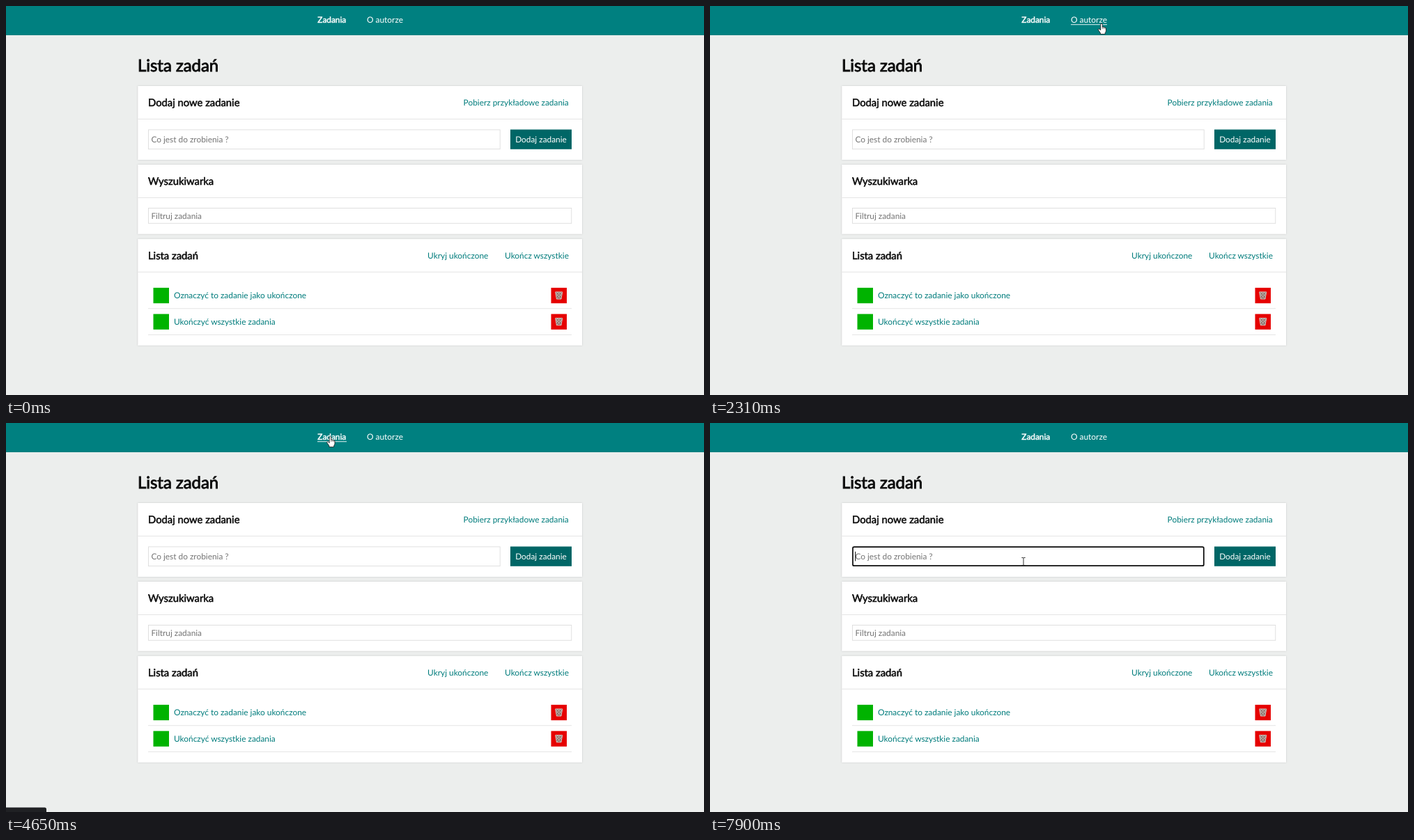
An HTML page for the animation above (8 s loop, 1002 by 559 pixels).

```html
<!DOCTYPE html>
<html lang="pl">
<meta charset="utf-8">
<title>Lista zadań</title>
<style>
  html, body { margin: 0; height: 100%; overflow: hidden; background: #eceeed }
  svg { display: block; width: 1002px; height: 559px }
  text { font: 11.88px Lato, sans-serif; fill: #0c0c0c; white-space: pre; text-rendering: geometricPrecision }
  .b { stroke: #0c0c0c; stroke-width: .038em }
  .copy { font-size: 11.74px }
  .h1 { font-size: 23.9px }
  .h2 { font-size: 14.8px }
  .h3 { font-size: 13.85px }
  .i { font-style: italic }
  .link { fill: #007c7c }
  .hint { fill: #757575 }
  .nav { fill: #fff }
  .nav.b { stroke: #fff }
  .mid { text-anchor: middle }
  .card { fill: #fff; filter: drop-shadow(0 0 1.2px #c4c6c6) }
  .line { fill: #e2e2e2 }
  .field { fill: #fff; stroke: #dcdcdc; stroke-width: .9 }
</style>
<svg id="stage" viewBox="0 0 1002 559"></svg>
<script>
const text = (x, y, cls, s) => `<text x="${x}" y="${y}" class="${cls}">${s}</text>`;
const rect = (x, y, w, h, attrs) => `<rect x="${x}" y="${y}" width="${w}" height="${h}" ${attrs}/>`;
const line = (x, y, w) => rect(x, y, w, .9, 'class="line"');

// White panel with a titled header
const card = (y, h, title) =>
  rect(189.3, y, 637.7, h, 'class="card"') + line(189.3, y + 47, 637.7) +
  text(204, y + 29.1, 'b h2', title);

const bin = (x, y) => `<g transform="translate(${x} ${y})" fill="none" stroke="#d9d2cb" stroke-width=".9">
  <path d="M.5 1.2H10.5L8.8 11.4H2.2Z" fill="#8d6f69"/>
  <path d="M.8 3 8.6 11M3.5 1.5 9 7.5M7 1.5 10 4.5M10.2 3 2.4 11M7.5 1.5 2 7.5M4 1.5 1 4.5" stroke-width=".7"/></g>`;

const task = (y, label) =>
  rect(211.5, y, 22.5, 22.3, 'fill="#00b300"') + text(241, y + 15, 'link', label) +
  rect(782.5, y, 22.5, 22.3, 'fill="#e60000"') + bin(788.2, y + 4.8) + line(204, y + 29.4, 608);

const tasksPage = text(189, 94.2, 'b h1', 'Lista zadań') +
  card(115, 106, 'Dodaj nowe zadanie') +
  text(732.2, 143.2, 'link mid', 'Pobierz przykładowe zadania') +
  rect(204.5, 177.9, 504.7, 27.7, 'class="field"') +
  text(208.4, 195.8, 'hint', 'Co jest do zrobienia ?') +
  rect(724, 177.5, 88, 28.3, 'fill="#006666"') +
  text(768, 195.8, 'nav mid', 'Dodaj zadanie') +
  card(228, 99.7, 'Wyszukiwarka') +
  rect(204.5, 290.5, 607.3, 21.8, 'class="field"') +
  text(208.4, 305.9, 'hint', 'Filtruj zadania') +
  card(334.8, 153, 'Lista zadań') +
  text(648.7, 362.7, 'link mid', 'Ukryj ukończone') +
  text(762, 362.7, 'link mid', 'Ukończ wszystkie') +
  task(404.9, 'Oznaczyć to zadanie jako ukończone') +
  task(442.6, 'Ukończyć wszystkie zadania') +
  `<g id="focus">${rect(205, 178.2, 503.8, 27, 'rx="2" fill="none" stroke="#0c0c0c" stroke-width="1.7"')}
   ${rect(208.2, 184.8, 1, 13.6, 'fill="#000"')}</g>`;

const aboutPage = text(189, 94.2, 'b h1', 'O autorze') +
  card(115, 317, 'Sebastian Dolań') + [
    [200.5, 'copy b', '"Nie tylko wysocy potrafią widzieć horyzonty"'],
    [214.4, 'copy', 'Nazywam Seba i jestem magistrem Inżynierii Biomedycznej.'],
    [240.1, 'copy i', 'Biomedical Engineer'],
    [269.2, 'b h3', 'Zainteresowania'],
    [297.3, 'copy', 'Bardzo lubię muzykę, prawie cały czas mi towarzyszy. Uwielbiam pływać, grać w piłkę nożną ( a nawet jestem'],
    [311, 'copy', 'trenerem), ogólnie sport i sporty nie tylko drużynowe. Potrafię obsługiwać się z bronią pneumatyczną.'],
    [336.2, 'copy', 'Bardo <tspan class="b">chciałbym</tspan> ukończyć ten kurs. Gdy to przeczytam za jakiś czas to mam nadzieję, że przyjdę tu z myślą o swoim'],
    [350, 'copy', '<tspan class="i">Homepage on recrutation</tspan>.'],
    [375.1, 'copy', 'Krótko o pracy magisterskiej'],
    [389, 'copy', 'Tematem mojej pracy była : "Analiza możliwości wykorzystania uczenia maszynowego w procesach diagnowania stanu'],
    [402.8, 'copy', 'organizmu człowieka na podstawie wyglądu tęczówek oczu"']
  ].map(([y, cls, s]) => text(204, y, cls, s)).join('');

const cursors = {
  arrow: '<path d="M0 0V10.6L2.5 8.4 4.2 12.2 6 11.4 4.3 7.7H7.6Z" fill="#fff" stroke="#111" stroke-width=".8"/>',
  hand: `<path d="M-1.3 1Q0-.8 1.3 1V5.2Q2.4 4.6 3.2 5.5 4.3 5 5 6 6.3 5.8 6.5 7V10.5Q6.4 12.5 5.2 13.6V15.4H-1.6V13.8L-4.9 8.9Q-4.6 7.4-3 8L-1.3 9.6Z" fill="#fff" stroke="#111" stroke-width=".8"/>
    <path d="M1.3 5V8M3.2 5.6V8M5 6.2V8.2" stroke="#111" stroke-width=".5"/>`,
  beam: '<path d="M-2.6-5.5H-.6L0-4.9.6-5.5H2.6M0-5V5M-2.6 5.5H-.6L0 4.9.6 5.5H2.6" fill="none" stroke="#333" stroke-width="1"/>'
};

stage.innerHTML = rect(0, 0, 1002, 559, 'fill="#eceeed"') + rect(0, 0, 1002, 42, 'fill="#008080"') +
  text(467.8, 24.4, 'nav mid" id="navTasks', 'Zadania') +
  text(544, 24.4, 'nav mid" id="navAbout', 'O autorze') +
  rect(0, 26.3, 0, .9, 'id="underline" fill="#fff"') +
  `<g id="tasks">${tasksPage}</g><g id="about">${aboutPage}</g>` +
  rect(-4, 552.4, 0, 12, 'id="bar" rx="2.5" fill="#202124"') +
  '<circle id="ring" r="10" fill="#ff0" fill-opacity=".47"/><g id="cursor"></g>';

const el = id => document.getElementById(id);
const show = (id, on) => el(id).setAttribute('visibility', on ? 'visible' : 'hidden');
const within = (t, a, b) => t >= a && t < b;

// Pointer path: time, x, y
const path = [
  [170, 944, 562], [990, 608, 60], [1010, 608, 60], [1560, 476, 25], [1660, 471, 20],
  [1820, 471, 20], [2310, 562, 25], [2460, 562, 25], [2510, 560, 25], [3190, 560, 25],
  [3570, 465.5, 19], [5750, 465.5, 19], [6080, 483, 56], [6410, 483, 58],
  [7000, 483, 58], [7490, 450, 199], [8000, 450, 199]
];

function pointer(t) {
  const i = path.findIndex(p => p[0] > t);
  if (i < 1) return path[0].slice(1);
  const [a, b] = [path[i - 1], path[i]];
  const k = (t - a[0]) / (b[0] - a[0]), e = (1 - Math.cos(Math.PI * k)) / 2;
  return [a[1] + (b[1] - a[1]) * e, a[2] + (b[2] - a[2]) * e];
}

let shape;
function draw(now) {
  const t = now % 8000, [x, y] = pointer(t);
  const about = within(t, 2800, 4610);
  const inNav = y > 12 && y < 31;
  const overTasks = inNav && within(x, 447, 489), overAbout = inNav && within(x, 518, 570);

  show('tasks', !about);
  show('about', about);
  show('focus', t >= 7780);
  el('navTasks').classList.toggle('b', !about);
  el('navAbout').classList.toggle('b', about);

  el('underline').setAttribute('x', overAbout ? 518 : 447);
  el('underline').setAttribute('width', overAbout ? 52 : overTasks ? 42 : 0);

  const barEnd = within(t, 1820, 2290) || within(t, 3500, 6330) ? 58 : within(t, 2700, 3500) ? 48 : -4;
  el('bar').setAttribute('width', barEnd + 4);

  const next = overTasks || overAbout ? 'hand' : within(y, 178, 206) && x < 709 ? 'beam' : 'arrow';
  if (next !== shape) el('cursor').innerHTML = cursors[shape = next];
  show('cursor', t >= 200);
  el('cursor').setAttribute('transform', `translate(${x} ${y})`);

  show('ring', within(t, 2660, 2800) || within(t, 4470, 4610) || within(t, 7780, 7900));
  el('ring').setAttribute('cx', x);
  el('ring').setAttribute('cy', y);
}

const start = performance.now();
(function loop() {
  draw(performance.now() - start);
  requestAnimationFrame(loop);
})();
</script>
</html>
```
